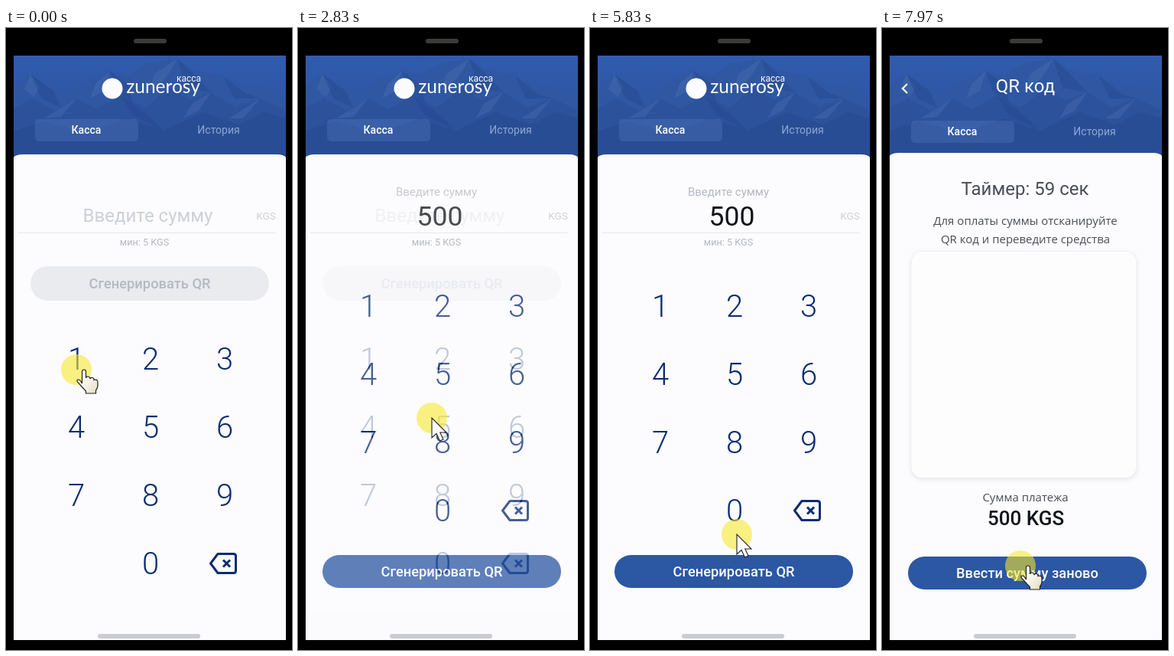
An HTML page that plays this animation: 374x812 px, repeating every 8000 ms.

```html
<!DOCTYPE html>
<html lang="ru">
<head>
<meta charset="utf-8">
<title>Касса</title>
<style>
  html, body { margin: 0; width: 100%; height: 100%; overflow: hidden; background: #000; }
  svg { display: block; width: 100vw; height: 100vh; }
  text { font-family: Roboto, sans-serif; }
  .open { font-family: "Open Sans", "Noto Sans", sans-serif; }
  .brand { font-family: Lato, sans-serif; }
</style>
</head>
<body>
<svg id="stage" viewBox="0 0 374 812" xmlns="http://www.w3.org/2000/svg">
  <defs>
    <linearGradient id="sky" x1="0" y1="0" x2="0" y2="1">
      <stop offset="0" stop-color="#315bad"/>
      <stop offset="1" stop-color="#294f9b"/>
    </linearGradient>
    <linearGradient id="skin" x1="0" y1="0" x2="1" y2="1">
      <stop offset=".3" stop-color="#fffffc"/>
      <stop offset="1" stop-color="#e4dcc0"/>
    </linearGradient>
    <filter id="soft" x="-10%" y="-10%" width="120%" height="120%">
      <feGaussianBlur stdDeviation="3"/>
    </filter>
    <clipPath id="top"><rect x="10" y="36" width="356" height="140"/></clipPath>
    <g id="header">
      <rect x="10" y="36" width="356" height="145" fill="url(#sky)"/>
      <g clip-path="url(#top)">
        <path d="M10 76L32 60L52 76L78 86L112 66L136 56L160 62L188 46L224 40L248 56L284 63L310 76L340 78L367 90V180H10Z" fill="#2f57a2"/>
        <path d="M10 104L34 92L64 108L92 92L118 106L150 88L182 104L214 78L240 94L268 84L300 104L332 92L367 108V180H10Z" fill="#2c529c"/>
        <path d="M10 134L50 122L104 137L160 118L206 134L258 110L304 126L338 110L367 118V180H10Z" fill="#294d95"/>
        <g fill="#5579b8" opacity=".3">
          <path d="M32 60L44 78L36 90L24 80Z"/>
          <path d="M136 56L128 82L110 92L118 72Z"/>
          <path d="M224 40L210 64L188 82L194 60Z"/>
          <path d="M268 84L252 108L232 118L244 98Z"/>
          <path d="M92 92L72 116L50 118Z"/>
          <path d="M332 92L310 118L292 118Z"/>
        </g>
        <g fill="#24478e" opacity=".4">
          <path d="M32 60L62 82L72 104L46 92Z"/>
          <path d="M136 56L160 74L166 98L144 82Z"/>
          <path d="M224 40L252 66L268 84L236 78Z"/>
          <path d="M284 63L314 86L332 92L298 92Z"/>
          <path d="M150 88L184 112L206 134L166 114Z"/>
        </g>
      </g>
    </g>
    <path id="erase" d="M277 686.500H297.500Q300.500 686.500 300.500 689.500V708.500Q300.500 711.500 297.500 711.500H277L267.500 699ZM284 694.500L293 703.500M293 694.500L284 703.500"
      fill="none" stroke="#0b2c72" stroke-width="3" stroke-linejoin="round"/>
  </defs>
  <rect width="374" height="812"/>
  <rect x="167" y="14" width="43" height="6" rx="3" fill="#3b3b38"/>
  <g id="screens"></g>
  <rect x="120" y="791" width="134" height="6" rx="3" fill="#cbccd0"/>
  <g id="cursor">
    <circle r="20" fill="#f9e82a" opacity=".58"/>
    <path id="arrow" d="M0 0V26L6 20.500L10.500 30L15 28L10.800 19H19Z" fill="#fdfdfd" stroke="#222" stroke-width="1.100"/>
    <path id="hand" d="M7.500 2.500Q7.500 0 10 0T12.500 2.500V11Q13 8.500 15.500 9T18 12Q18.500 10 21 10.500T23 13.500Q27.500 12 28 16V21Q27.500 25 25.500 27V31H12.500V28L6 21L1.500 16Q0 13 2.500 13T7.500 18Z"
      fill="url(#skin)" stroke="#222" stroke-width="1.200"/>
  </g>
</svg>
<script>
const LOOP = 8000;
const NAVY = '#0b2c72', WHITE = '#fcfcfe', BLUE = '#2c57a3';
const PALE = '#cdd0d6', GREY = '#b6b9c1', INK = '#4a4d55', BLACK = '#101318';
const $ = id => document.getElementById(id);

const txt = (s, x, y, size, fill, weight = 400, cls = '') =>
  `<text class="${cls}" x="${x}" y="${y}" font-size="${size}" fill="${fill}" font-weight="${weight}" text-anchor="middle">${s}</text>`;

const button = (s, x, y, h, fill, color) =>
  `<rect x="${x}" y="${y}" width="312" height="${h}" rx="${h / 2}" fill="${fill}"/>` +
  txt(s, x + 156, y + h / 2 + 6.5, 18.3, color, 500);

const page = (y, tabY, head, body) => `<use href="#header"/>${head}` +
  `<rect x="38" y="${tabY - 19}" width="135" height="29" rx="5" fill="#5f86d0" opacity=".25"/>` +
  txt('Касса', 105, tabY, 14, '#fff', 500) + txt('История', 278, tabY, 14, '#8fa6d0') +
  `<path d="M10 ${y + 4}Q13 ${y} 22 ${y}H354Q363 ${y} 366 ${y + 4}V799H10Z" fill="${WHITE}"/>${body}`;

const logo = '<circle cx="139" cy="79" r="13.500" fill="#fcfcfe"/>' +
  txt('zunerosy', 205.5, 85, 24.5, WHITE, 400, 'brand') + txt('касса', 239, 70, 12, WHITE);

function keypad(y) {
  const keys = [...'123456789'].map((d, i) =>
    txt(d, 92 + i % 3 * 97, y + Math.floor(i / 3) * 89, 40, NAVY, 300));
  return keys.join('') + txt('0', 189, y + 267, 40, NAVY, 300) +
    `<use href="#erase" y="${y - 446}"/>`;
}

const amountRow = txt('KGS', 340, 250, 13.5, PALE) +
  '<path d="M16 267.500H353" stroke="#e6e7eb"/>' +
  txt('мин: 5 KGS', 181, 284, 12.7, GREY);

const entry = page(165, 138, logo, txt('Введите сумму', 185.5, 253, 24, PALE) + amountRow +
  button('Сгенерировать QR', 32, 311, 45, '#e9ebef', '#b5b9c3') + keypad(446));

const filled = page(165, 138, logo, txt('Введите сумму', 181, 219, 15, GREY) +
  txt('500', 185.5, 258, 35.5, BLACK) + amountRow + keypad(377) +
  button('Сгенерировать QR', 32, 688, 43, BLUE, WHITE));

const payment = page(163, 140,
  txt('QR код', 187.5, 84, 24, WHITE) +
  '<path d="M33 73L27 79L33 85" fill="none" stroke="#fff" stroke-width="2.200"/>',
  txt('Таймер: 59 сек', 187, 218, 24, INK) +
  txt('Для оплаты суммы отсканируйте', 187.5, 257, 15, INK, 400, 'open') +
  txt('QR код и переведите средства', 187.5, 281, 15, INK, 400, 'open') +
  '<rect x="38" y="293" width="295" height="296" rx="14" fill="#e2e4ea" filter="url(#soft)"/>' +
  '<rect x="38.500" y="292" width="294" height="295" rx="14" fill="#fdfdfe"/>' +
  txt('Сумма платежа', 187.5, 618, 15, INK, 400, 'open') +
  txt('500 KGS', 188, 649, 26, BLACK, 500) +
  button('Ввести сумму заново', 34, 690, 43, BLUE, WHITE));

$('screens').innerHTML = [entry, filled, payment].map(s => `<g>${s}</g>`).join('');
const [, filledEl, paymentEl] = $('screens').children;

// Pointer path: time, x, y
const path = [
  [0, 92, 446], [500, 90, 446], [1150, 62, 447], [1750, 62, 447], [2830, 175, 509],
  [3350, 192, 461], [4300, 192, 461], [5200, 192, 640], [5830, 192, 661],
  [6500, 189, 702], [7550, 189, 702], [7900, 181, 702], [LOOP, 181, 702]
];
const ramp = (t, a, b) => Math.min(1, Math.max(0, (t - a) / (b - a)));
const ease = p => p * p * (3 - 2 * p);

function pointer(t) {
  const i = path.findIndex(k => k[0] > t);
  const [t0, x0, y0] = path[i - 1], [t1, x1, y1] = path[i];
  const p = ease(ramp(t, t0, t1));
  return [x0 + (x1 - x0) * p, y0 + (y1 - y0) * p];
}

function draw(t) {
  filledEl.setAttribute('opacity', ramp(t, 2455, 2955));
  paymentEl.setAttribute('opacity', ramp(t, 7430, 7900));
  $('cursor').setAttribute('transform', `translate(${pointer(t)})`);
  const isHand = t < 800 || t >= 7750;
  $('hand').setAttribute('visibility', isHand ? 'visible' : 'hidden');
  $('arrow').setAttribute('visibility', isHand ? 'hidden' : 'visible');
}

const start = performance.now();
function tick() {
  draw((performance.now() - start) % LOOP);
  requestAnimationFrame(tick);
}
tick();
</script>
</body>
</html>
```
